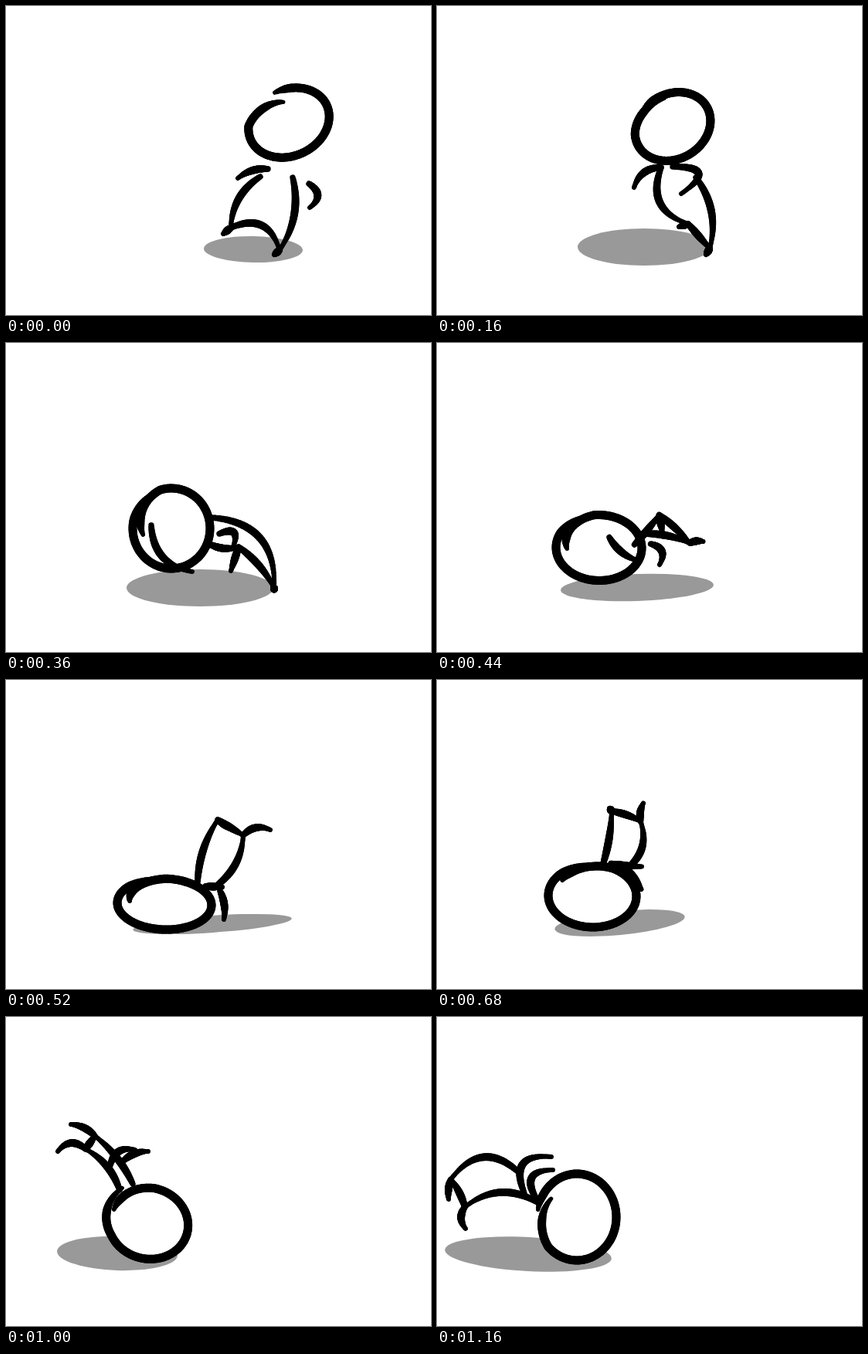
Animation of 550x400 px, one loop 1200 ms. Source, as an HTML page with a canvas:

```html
<!DOCTYPE html>
<html lang="en">
<head>
<meta charset="utf-8">
<title>Tumbling figure</title>
<style>
html, body { margin: 0; width: 100%; height: 100%; overflow: hidden; background: #fff; }
canvas { display: block; }
</style>
</head>
<body>
<canvas id="stage" width="550" height="400"></canvas>
<script>
const ctx = document.getElementById('stage').getContext('2d');
const LOOP = 1200, STEP = 40, RAD = Math.PI / 180;
const HELD = [720, 800, 880, 960]; // steps that repeat the drawing before them

// Joints, in the order each pose lists them
const [CHEST, BACK, HIP_L, HIP_R, FOOT_L, FOOT_R, ARM_L, HAND_L, ARM_R, HAND_R] = Array(10).keys();
// Limbs, in the order of the bends
const LIMBS = [
  [CHEST, HIP_L], [BACK, HIP_R], [HIP_L, HIP_R],
  [HIP_L, FOOT_L], [HIP_R, FOOT_R],
  [ARM_L, HAND_L], [ARM_R, HAND_R]
];
const tracks = { head: [], shadow: [], joints: [], bends: [] };

// head: x, y, radii, tilt, from and to angle, curl inwards at both ends
// shadow: x, y, radii, tilt
function pose(time, parts) {
  for (const name in parts) tracks[name].push({ time, v: parts[name] });
}

pose(0, { // walking in
  head: [366, 151, 54, 43, -25, 245, 613, 0, 0.36],
  shadow: [320, 315, 64, 17, 1],
  joints: [329,221, 371,222, 291,287, 354,316, 281,295, 347,322, 339,211, 300,223, 392,230, 393,261],
  bends: [0.13, -0.11, -0.28, 0, 0, 0.1, -0.35]
});
pose(160, { // leaning forward
  head: [305, 156, 51, 42, -30, 213, 611, 0, 0.1],
  shadow: [268, 312, 86, 24, 0],
  joints: [290,209, 335,222, 325,282, 353,314, 313,286, 348,322, 290,209, 255,235, 305,208, 316,243],
  bends: [0.26, -0.12, 0, 0, 0, 0.18, -0.8]
});
pose(360, { // hands down
  head: [214, 240, 50, 52, 0, 168, 595, 0.25, 0],
  shadow: [251, 317, 95, 24, 0],
  joints: [263,260, 266,226, 301,264, 347,317, 291,295, 347,320, 188,236, 241,296, 276,247, 294,264],
  bends: [0.1, -0.24, -0.06, 0, 0, 0.2, -0.57]
});
pose(520, { // head squashed, kicking up
  head: [205, 290, 61, 33, 2, 187, 625, 0.26, 0],
  shadow: [267, 316, 103, 11, -4],
  joints: [248,262, 270,268, 274,181, 307,201, 292,194, 342,194, 258,267, 280,268, 277,273, 282,310],
  bends: [-0.07, 0.12, 0, 0, -0.18, 0, -0.08]
});
pose(840, { // headstand
  head: [197, 269, 53, 48, 0, 245, 628, 0.06, 0],
  shadow: [206, 313, 66, 20, -7],
  joints: [181,217, 218,223, 178,159, 220,165, 155,138, 192,125, 192,208, 250,215, 212,215, 247,232],
  bends: [0.14, 0.24, -0.1, 0, 0, 0.04, 0]
});
pose(1000, { // tipping over
  head: [184, 267, 52, 46, 14, 203, 597, 0.08, -0.15],
  shadow: [144, 306, 78, 22, 2],
  joints: [147,224, 164,216, 103,171, 115,154, 67,174, 84,139, 135,192, 167,172, 152,186, 184,174],
  bends: [0.1, 0.06, 0, 0.26, 0.1, -0.25, -0.1]
});
pose(1120, { // legs landing
  head: [181, 259, 51, 56, 0, 190, 573, 0, 0.22],
  joints: [130,240, 108,203, 36,246, 18,210, 37,274, 15,236, 113,228, 148,181, 129,236, 150,198],
  bends: [0.17, 0.28, 0.05, 0.19, 0.06, -0.41, -0.44]
});
pose(1160, { shadow: [118, 307, 108, 22, 3] });

function valueAt(name, time) {
  const track = tracks[name];
  const next = track.findIndex(k => k.time > time);
  if (next < 0) return track[track.length - 1].v;
  const a = track[next - 1], b = track[next];
  const k = (time - a.time) / (b.time - a.time);
  return a.v.map((v, i) => v + (b.v[i] - v) * k);
}

// Draws a curve, point(u) for u from 0 to 1, with a width that depends on u
function brush(point, width, steps) {
  let [x, y] = point(0);
  for (let i = 1; i <= steps; i++) {
    const [nx, ny] = point(i / steps);
    ctx.lineWidth = width((i - 0.5) / steps);
    ctx.beginPath();
    ctx.moveTo(x, y);
    ctx.lineTo(nx, ny);
    ctx.stroke();
    [x, y] = [nx, ny];
  }
}

function ellipse(x, y, rx, ry, tilt, color) {
  ctx.fillStyle = color;
  ctx.beginPath();
  ctx.ellipse(x, y, rx, ry, tilt * RAD, 0, 2 * Math.PI);
  ctx.fill();
}

function drawHead([x, y, rx, ry, tilt, from, to, curlIn, curlOut]) {
  ellipse(x, y, rx, ry, tilt, '#fff');
  const cos = Math.cos(tilt * RAD), sin = Math.sin(tilt * RAD);
  const point = u => {
    const angle = (from + (to - from) * u - tilt) * RAD;
    const r = 1 - curlIn * Math.max(0, 1 - u / 0.2) - curlOut * Math.max(0, 1 - (1 - u) / 0.2);
    const ex = rx * r * Math.cos(angle), ey = ry * r * Math.sin(angle);
    return [x + ex * cos - ey * sin, y + ex * sin + ey * cos];
  };
  const taper = u => 5 + 6 * Math.min(1, u / 0.05, (1 - u) / 0.1);
  brush(point, taper, 120);
}

// Arc between two joints; bend is its height as a share of its length
function drawLimb(x0, y0, x1, y1, bend) {
  const dx = x1 - x0, dy = y1 - y0;
  const point = u => {
    const h = 4 * u * (1 - u) * bend;
    return [x0 + dx * u - dy * h, y0 + dy * u + dx * h];
  };
  brush(point, u => 6 + 4 * Math.sin(Math.PI * Math.min(1, u + 0.1)), 32);
}

function draw(time) {
  ctx.fillStyle = '#fff';
  ctx.fillRect(0, 0, 550, 400);
  ctx.strokeStyle = '#000';
  ctx.lineCap = 'round';
  ellipse(...valueAt('shadow', time), '#999');
  drawHead(valueAt('head', time));
  const joints = valueAt('joints', time), bends = valueAt('bends', time);
  const joint = i => joints.slice(2 * i, 2 * i + 2);
  LIMBS.forEach(([a, b], i) => drawLimb(...joint(a), ...joint(b), bends[i]));
}

const start = performance.now();
function tick() {
  const now = Math.max(0, performance.now() - start) % LOOP;
  const time = Math.floor(now / STEP) * STEP;
  draw(HELD.includes(time) ? time - STEP : time);
  requestAnimationFrame(tick);
}
tick();
</script>
</body>
</html>
```
